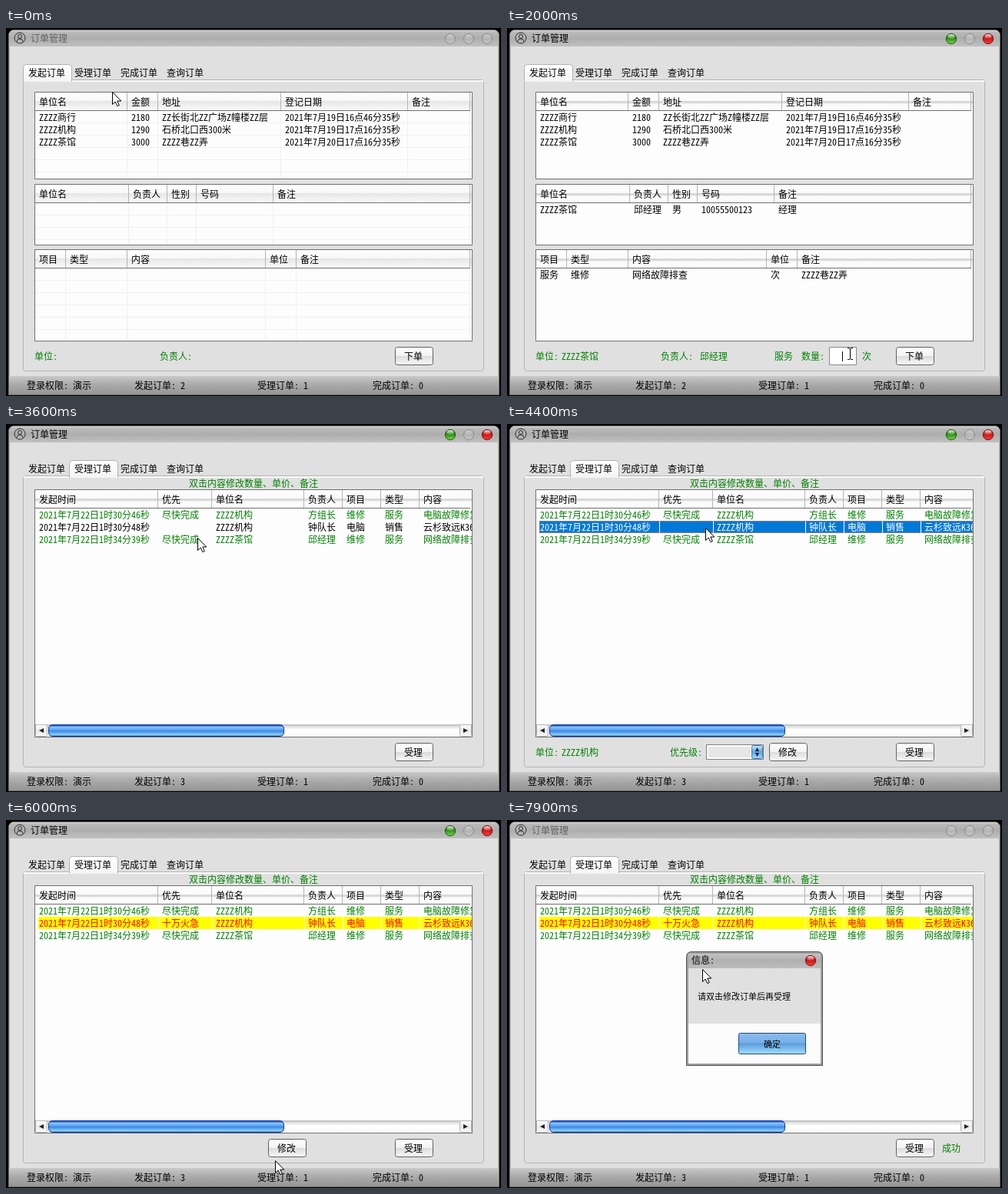
Animation, 644 px wide and 479 px high, one loop 8 s. Source, as an HTML page with a canvas:

```html
<!DOCTYPE html>
<html lang="zh">
<head>
<meta charset="utf-8">
<style>
html, body { margin: 0; width: 100%; height: 100%; overflow: hidden; background: #000; }
canvas { display: block; }
</style>
</head>
<body>
<canvas width="644" height="479"></canvas>
<script>
const c = document.querySelector('canvas').getContext('2d');
const FONT = '"Noto Sans Mono CJK SC", "Noto Sans CJK SC", "Noto Sans CJK", monospace';
const GREEN = '#008000', LOOP = 8000, STEP = 100;

const tea = 'ZZZZ茶馆', office = 'ZZZZ机构', lane = 'ZZZZ巷ZZ弄', boss = '邱经理';
const orders = [
  ['ZZZZ商行', '2180', 'ZZ长街北ZZ广场Z幢楼ZZ层', '2021年7月19日16点46分35秒'],
  [office, '1290', '石桥北口西300米', '2021年7月19日17点16分35秒'],
  [tea, '3000', lane, '2021年7月20日17点16分35秒']
];
const contacts = [[tea, boss, '男', '10055500123', '经理']];
const services = [['服务', '维修', '网络故障排查', '次', lane]];

// Pointer path: time, x, y
const path = [
  [0, 138, 83], [300, 70, 147], [700, 75, 236], [900, 100, 242], [1100, 338, 334],
  [1400, 200, 322], [1900, 446, 424], [2200, 446, 424], [2500, 528, 430], [2700, 520, 430],
  [3100, 112, 60], [3500, 112, 60], [3600, 249, 148], [4000, 261, 147], [4200, 261, 147],
  [4400, 258, 135], [4900, 325, 428], [5100, 325, 428], [5300, 317, 435], [5400, 326, 428],
  [5700, 290, 468], [5900, 362, 432], [6000, 350, 443], [6200, 350, 443], [6800, 290, 150],
  [6900, 290, 138], [7000, 294, 155], [7200, 294, 155], [7500, 530, 428], [7600, 530, 428],
  [7900, 254, 194]
];

function pointerAt(t) {
  const i = path.findIndex(p => p[0] > t);
  if (i < 0) return path[path.length - 1].slice(1);
  const [t0, x0, y0] = path[i - 1], [t1, x1, y1] = path[i];
  const u = (t - t0) / (t1 - t0), e = u * u * (3 - 2 * u);
  return [Math.round(x0 + (x1 - x0) * e), Math.round(y0 + (y1 - y0) * e)];
}

function shade(y0, y1, ...stops) {
  const g = c.createLinearGradient(0, y0, 0, y1);
  stops.forEach(([at, color]) => g.addColorStop(at, color));
  return g;
}

function fill(x, y, w, h, color) {
  c.fillStyle = color;
  c.fillRect(x, y, w, h);
}

function box(x, y, w, h, radius, color, border) {
  c.beginPath();
  c.roundRect(x + .5, y + .5, w - 1, h - 1, radius);
  c.fillStyle = color;
  c.fill();
  c.strokeStyle = border;
  c.stroke();
}

function text(s, x, mid, color = '#000', size = 12, weight = 400) {
  c.font = `${weight} ${size}px ${FONT}`;
  c.fillStyle = color;
  c.fillText(s, x, mid + 5);
}

// Glossy caption button: dark upper half under a highlight, bright lower half
function ball(x, y, dark, bright, gloss, rim) {
  c.beginPath();
  c.arc(x, y, 6.7, 0, 7);
  c.fillStyle = shade(y - 7, y + 7, [0, dark], [.45, dark], [1, bright]);
  c.fill();
  c.strokeStyle = rim;
  c.stroke();
  c.beginPath();
  c.ellipse(x, y - 3, 4.5, 3, 0, 0, 7);
  c.fillStyle = shade(y - 6, y, [0, gloss], [1, 'rgba(255,255,255,.1)']);
  c.fill();
}
const grayBall = (x, y) => ball(x, y, '#b0b0b0', '#c8c8c8', 'rgba(255,255,255,.3)', '#8c8c8c');
const redBall = (x, y) => ball(x, y, '#c81414', '#ff4040', 'rgba(255,255,255,.85)', '#701818');
const greenBall = (x, y) => ball(x, y, '#2c8c14', '#78e050', 'rgba(255,255,255,.85)', '#2c5020');

function button(label, x) {
  box(x, 415, 50, 24, 3, shade(415, 439, [0, '#fff'], [.5, '#f2f2f2'], [.52, '#dcdcdc'], [1, '#fafafa']), '#606060');
  text(label, x + 12, 427);
}

function list(top, bottom, cols, heads, rows, { grid, style = () => null, right = 603 } = {}) {
  const edges = [...cols.slice(1), right];
  box(37, top, 570, bottom - top + 1, 0, '#fdfdfd', '#707070');
  c.save();
  c.beginPath();
  c.rect(38, top + 1, 568, bottom - top - 1);
  c.clip();
  const head = grid
    ? [[0, '#fff'], [.45, '#f8f8f8'], [.5, '#e6e6e6'], [1, '#fafafa']]
    : [[0, '#fdfdfd'], [.46, '#fafafa'], [.5, '#d8d8d8'], [.6, '#dcdcdc'], [.64, '#fafafa'], [1, '#fdfdfd']];
  fill(38, top + 1, 568, 23, shade(top + 1, top + 24, ...head));
  fill(38, top + 24, 566, 1, '#707070');
  edges.forEach(x => fill(x, top + 1, 1, 23, '#b4b4b4'));
  if (grid) {
    for (let y = top + 40; y < bottom; y += 16) fill(38, y, 566, 1, '#f0f0f0');
    edges.forEach(x => fill(x, top + 25, 1, bottom - top, '#f0f0f0'));
  }
  heads.forEach((s, i) => text(s, cols[i] + 6, top + 13));
  rows.forEach((row, r) => {
    const y = top + 25 + r * 16, { bg, fg = '#000', focus } = style(r) || {};
    if (bg) {
      fill(42, y, right - 42, 16, bg);
      cols.slice(1).forEach(x => fill(x + 1, y, 1, 16, '#fff'));
    }
    if (focus) {
      c.setLineDash([1, 1]);
      c.strokeStyle = '#ff8728';
      c.strokeRect(42.5, y + .5, right - 43, 15);
      c.setLineDash([]);
    }
    row.forEach((s, i) => text(s, cols[i] + 6, y + 8, fg));
  });
  c.restore();
}
const SELECTED = { bg: '#0078d7', fg: '#fff', focus: true };

function windowFrame(active, tab, placed) {
  fill(0, 0, 644, 479, '#000');
  box(3, 2, 639, 476, [7, 7, 0, 0], '#e0e0e0', '#6c6c6c');
  c.beginPath();
  c.roundRect(4, 3, 637, 21, [6, 6, 0, 0]);
  c.fillStyle = shade(3, 24, [0, '#d4d4d4'], [.12, '#bababa'], [.5, '#aeaeae'], [1, '#c0c0c0']);
  c.fill();
  [4, 640].forEach(x => fill(x, 24, 1, 429, '#b4b4b4'));
  fill(4, 453, 637, 24, shade(453, 477, [0, '#cacaca'], [.3, '#b4b4b4'], [.55, '#a6a6a6'], [1, '#969696']));

  c.strokeStyle = '#303030';
  c.beginPath();
  c.arc(18, 13, 7, 0, 7);
  c.moveTo(20.5, 11);
  c.arc(18, 11, 2.5, 0, 7);
  c.moveTo(14, 18);
  c.arc(18, 18, 4, Math.PI, 0);
  c.stroke();
  text('订单管理', 32, 13, active ? '#000' : '#606060', 12, 500);
  (active ? greenBall : grayBall)(578, 14);
  grayBall(602, 14);
  (active ? redBall : grayBall)(626, 14);

  box(22, 67, 600, 380, 3, '#e0e0e0', '#b4b4b4');
  fill(23, 68, 598, 2, '#fafafa');
  box(tab ? 82 : 22, 47, 64, 27, 4, shade(47, 70, [0, '#fff'], [1, '#f4f4f4']), '#b0b0b0');
  fill(23, 70, 598, 5, '#e0e0e0');
  ['发起订单', '受理订单', '完成订单', '查询订单'].forEach((s, i) => text(s, 29 + i * 60, 58));

  [['登录权限:', '演示', 27], ['发起订单:', placed, 167], ['受理订单:', 1, 327], ['完成订单:', 0, 477]]
    .forEach(([s, v, x]) => { text(s, x, 465); text(String(v), x + 60, 465); });
}

function placeOrderPage(t) {
  const grid = t < 300, hasOrder = t >= 300 && t < 2500, hasContact = t >= 700 && t < 2500;
  const picked = t >= 1400 && t < 2500;
  const choose = (row, from, to) => r => r === row && t >= from && t < to ? SELECTED : null;
  list(83, 196, [37, 157, 197, 357, 522], ['单位名', '金额', '地址', '登记日期', '备注'], orders,
    { grid, style: choose(2, 300, 700) });
  list(203, 282, [37, 159, 209, 247, 347], ['单位名', '负责人', '性别', '号码', '备注'], hasOrder ? contacts : [],
    { grid, style: choose(0, 700, 1400) });
  list(288, 407, [37, 77, 157, 337, 377], ['项目', '类型', '内容', '单位', '备注'], hasContact ? services : [],
    { grid, style: choose(0, 1400, 1900) });
  text('单位:', 37, 427, GREEN);
  text('负责人:', 200, 427, GREEN);
  if (hasOrder) text(tea, 71, 427, GREEN);
  if (hasContact) text(boss, 251, 427, GREEN);
  if (picked) {
    text('服务', 348, 427, GREEN);
    text('数量:', 383, 427, GREEN);
    text('次', 462, 427, GREEN);
    box(419, 415, 36, 24, 0, '#fff', '#888');
    if (t >= 2200) text('1', 434, 427);
    else if (t >= 1900) fill(436, 421, 1, 13, '#000');
  }
  button('下单', 506);
}

function arrow(x, y, dx, dy) {
  c.fillStyle = '#202020';
  c.beginPath();
  c.moveTo(x + dx, y + dy);
  c.lineTo(x - dx + dy, y - dy + dx);
  c.lineTo(x - dx - dy, y - dy - dx);
  c.fill();
}

function scrollbar() {
  fill(38, 391, 568, 16, shade(391, 407, [0, '#b8b8b8'], [.2, '#e4e4e4'], [.45, '#fff'], [1, '#f8f8f8']));
  [[38, -1], [590, 1]].forEach(([x, dir]) => {
    box(x, 391, 16, 16, 2, shade(391, 407, [0, '#fff'], [.5, '#e8e8e8'], [1, '#fafafa']), '#b8b8b8');
    arrow(x + 8, 399, dir * 3, 0);
  });
  box(55, 391, 307, 16, 5,
    shade(391, 407, [0, '#1848a8'], [.14, '#3878d8'], [.22, '#8cc4fa'], [.45, '#5aa0f0'], [.55, '#3c88e6'],
      [.85, '#8cd2ff'], [1, '#1848a8']), '#103090');
}

function priorityBox(t) {
  text('优先级:', 212, 427, GREEN);
  box(259, 417, 75, 20, 0, '#fff', '#808080');
  fill(262, 420, 55, 14, '#e6e6e6');
  if (t >= 5700) text('十万火急', 265, 427);
  box(318, 418, 15, 18, 2, shade(418, 436, [0, '#d4ecff'], [.5, '#58a4ec'], [1, '#a8dcff']), '#4078b8');
  arrow(325.5, 423.5, 0, -2.5);
  arrow(325.5, 430.5, 0, 2.5);
}

function acceptPage(t) {
  const urgent = t >= 5900, chosen = t >= 4400 && t < 5900;
  const rows = [
    ['2021年7月22日1时30分46秒', '尽快完成', office, '方组长', '维修', '服务', '电脑故障修复'],
    ['2021年7月22日1时30分48秒', urgent ? '十万火急' : '', office, '钟队长', '电脑', '销售', '云杉致远K36'],
    ['2021年7月22日1时34分39秒', '尽快完成', tea, boss, '维修', '服务', '网络故障排查']
  ];
  const style = r => {
    if (r !== 1) return { fg: GREEN };
    if (chosen || t >= 6900 && t < 7200) return SELECTED;
    return urgent ? { bg: '#ff0', fg: '#f00' } : null;
  };
  text('双击内容修改数量、单价、备注', 238, 77, GREEN);
  list(85, 407, [37, 197, 267, 387, 437, 487, 537],
    ['发起时间', '优先', '单位名', '负责人', '项目', '类型', '内容'], rows, { style, right: 606 });
  scrollbar();
  if (chosen) {
    text('单位:', 37, 427, GREEN);
    text(office, 71, 427, GREEN);
    priorityBox(t);
  }
  if (t >= 4400 && t < 6100) button('修改', 341);
  button('受理', 506);
  if (t >= 6100) text('成功', 566, 427, GREEN);
}

function dropdown(t) {
  box(259, 437, 75, 41, 0, '#fff', '#808080');
  const hover = t >= 5600;
  if (hover) fill(260, 458, 73, 17, '#0078d7');
  text('尽快完成', 265, 448);
  text('十万火急', 265, 466, hover ? '#fff' : '#000');
}

function dialog() {
  box(233, 171, 178, 149, [6, 6, 0, 0], '#a0a0a0', '#505050');
  fill(236, 174, 172, 19, shade(173, 193, [0, '#c4c4c4'], [.5, '#b0b0b0'], [1, '#bcbcbc']));
  fill(236, 193, 172, 72, '#e0e0e0');
  fill(236, 265, 172, 52, '#fcfcfc');
  text('信息:', 240, 182, '#000', 12, 500);
  redBall(395, 183);
  text('请双击修改订单后再受理', 248, 229, '#000', 11);
  box(301, 277, 88, 28, 2,
    shade(277, 305, [0, '#8cbcec'], [.45, '#78b0e8'], [.5, '#5c9cdc'], [1, '#a4e0ff']), '#284878');
  text('确定', 334, 291, '#000', 11);
}

const arrowShape = new Path2D('M.5 .5V16.5L4.2 13L6.8 18.6L9.3 17.5L6.8 12H11.8Z');
const beamShape = new Path2D('M-3 -7.5H-1L.5 -6.5L2 -7.5H4M.5 -6.5V6.5M-3 7.5H-1L.5 6.5L2 7.5H4');

function pointer(t) {
  const [x, y] = pointerAt(t);
  c.save();
  c.translate(x, y);
  c.strokeStyle = '#000';
  if (t >= 1900 && t <= 2200) c.stroke(beamShape);
  else {
    c.fillStyle = '#fff';
    c.fill(arrowShape);
    c.stroke(arrowShape);
  }
  c.restore();
}

function draw(now) {
  const t = Math.floor(now % LOOP / STEP) * STEP;
  const open = t >= 5400 && t < 5700, warned = t >= 7500, accept = t >= 3200;
  windowFrame(t >= 300 && !open && !warned, accept ? 1 : 0, t < 2500 ? 2 : 3);
  (accept ? acceptPage : placeOrderPage)(t);
  if (open) dropdown(t);
  if (warned) dialog();
  pointer(t);
}

const start = performance.now();
(function tick() {
  draw(performance.now() - start);
  requestAnimationFrame(tick);
})();
</script>
</body>
</html>
```
